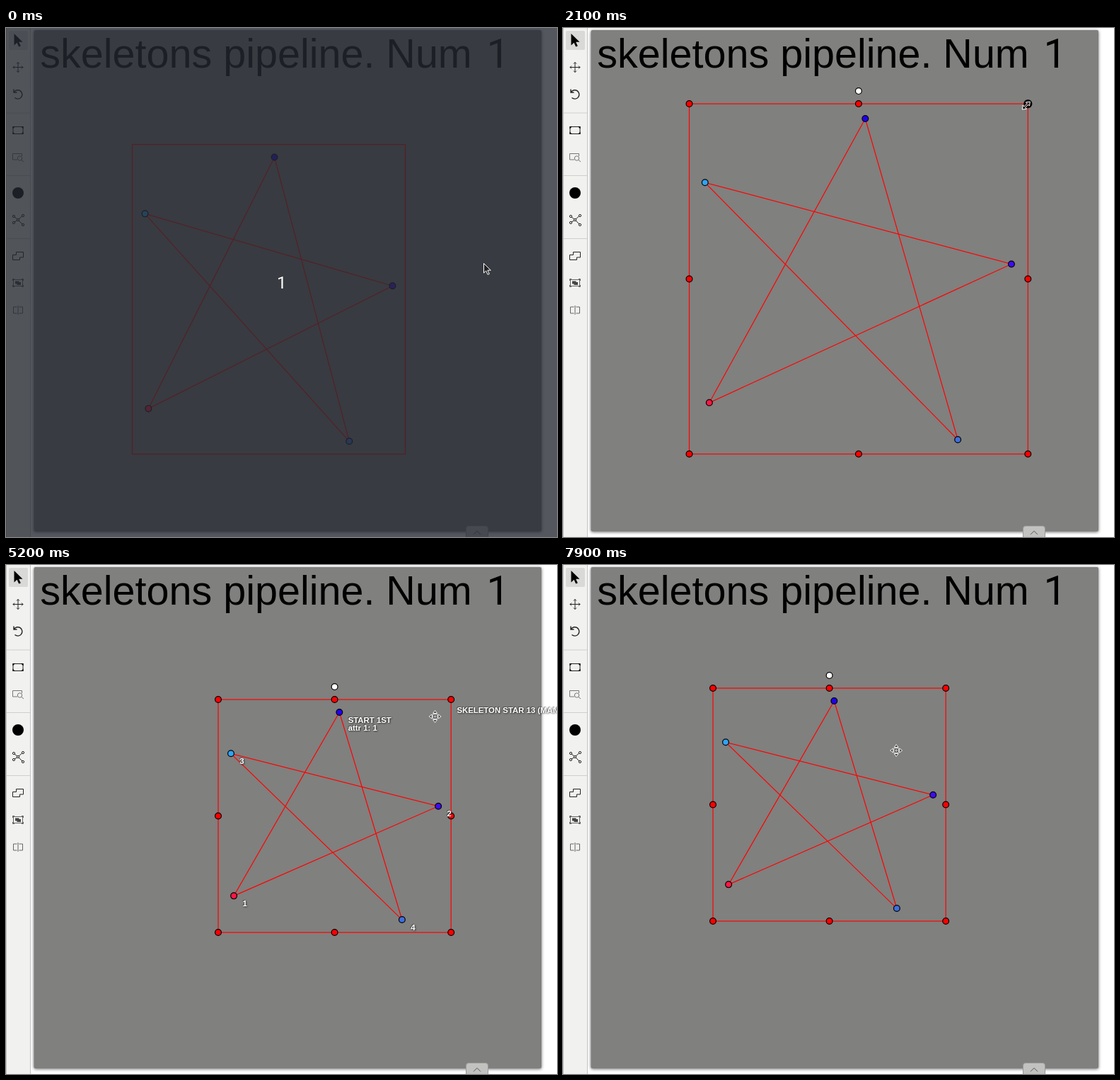
Write an HTML page that moves like this. It is 779 by 719 pixels and loops after 8 s.

```html
<!DOCTYPE html>
<html lang="en">
<head>
<meta charset="utf-8">
<title>Skeleton editing</title>
<style>
  html, body { margin: 0; width: 100%; height: 100%; overflow: hidden; background: #fff; }
  svg { display: block; width: 779px; height: 719px; }
  text { font-family: "Liberation Sans", Arial, sans-serif; }
  .one { font-family: Roboto, sans-serif; }
  .canvas { filter: drop-shadow(0 1px 2px rgba(0, 0, 0, .6)); }
  .icons { fill: none; stroke: #222; stroke-width: 1; }
  .icons .solid { fill: #000; stroke: none; }
  .edges { fill: none; stroke: #f00; stroke-width: 1.2; }
  .dots { stroke: #000; stroke-width: 1.2; }
  .labels { fill: #fff; font-size: 11.4px; font-weight: bold;
    filter: drop-shadow(1px 1px 1px rgba(0, 0, 0, .6)) drop-shadow(-.5px -.5px .5px rgba(0, 0, 0, .35)); }
</style>
</head>
<body>
<svg viewBox="0 0 779 719">
  <rect width="779" height="719" fill="#fff"/>
  <rect width="34.5" height="719" fill="#f1f1ef"/>
  <path d="M.5 0V719M34.5 0V719" stroke="#c4c4c2"/>
  <path d="M1 120H34M1 208.5H34M1 297.5H34" stroke="#cfcfcd"/>
  <rect x="4" y="4" width="27" height="27" rx="2" fill="#d9d9d7"/>
  <g class="icons">
    <path class="solid" d="M11.5 8V24.5L15.5 20.8L18.2 26.6L20.8 25.4L18.2 19.8H23.5Z"/>
    <path d="M17 48.5V62.5M10 55.5H24M15 50.5L17 48.5L19 50.5M15 60.5L17 62.5L19 60.5M12 53.5L10 55.5L12 57.5M22 53.5L24 55.5L22 57.5"/>
    <path d="M11.5 90.5A6.2 6.2 0 1 1 12.5 98.5M11 86.5V91H15.5" stroke-width="1.4"/>
    <rect x="10" y="139.500" width="14" height="10"/>
    <path class="solid" d="M9.500 139H13L9.500 142.500ZM24.500 139V142.500L21 139ZM24.500 150H21L24.500 146.500ZM9.500 150V146.500L13 150Z"/>
    <g stroke="#777"><path d="M16 186H9.500V177.500H22.500V181"/><circle cx="19.500" cy="184" r="3.200"/><path d="M22 186.500L25 189"/></g>
    <circle class="solid" cx="17" cy="233" r="8"/>
    <path d="M11.500 266.500L17 271L23 265.500M17 271L11.500 274.500M17 271L23 277"/>
    <g fill="#f1f1ef"><circle cx="11" cy="266" r="1.600"/><circle cx="24" cy="265" r="1.600"/><circle cx="11" cy="275" r="1.600"/><circle cx="24" cy="278" r="1.600"/><circle cx="17" cy="271" r="1.600"/></g>
    <path d="M14.500 316.500H24.500V324H19.500V327.500H9.500V320.500H14.500Z"/>
    <g stroke="#666"><rect x="10.500" y="355.500" width="13" height="9"/><path d="M9.500 357V354.500H12M22 354.500H24.500V357M24.500 363V365.500H22M12 365.500H9.500V363"/></g>
    <path d="M13 357.500H18.500V359H21V363H15.500V361.500H13Z" fill="#444" stroke="none"/>
    <path d="M15.500 394H10.500V403H15.500M18.500 394H23.500V403H18.500M17 392V405" stroke="#666"/>
  </g>

  <rect class="canvas" x="39.500" y="3" width="717.500" height="708" rx="2" fill="#80807e"/>
  <text x="48.300" y="56" font-size="57.500">skeletons pipeline. Num</text>
  <text class="one" x="679.500" y="56" font-size="57.500">1</text>
  <path d="M650.500 719V707Q650.500 703.500 654 703.500H678Q681.500 703.500 681.500 707V719" fill="#c2c2c0" stroke="#9a9a9a"/>
  <path d="M661 715.500L666 710.500L671 715.500" fill="none" stroke="#555"/>

  <g class="edges"><rect id="box"/><path id="star"/></g>
  <g id="dots" class="dots"></g>
  <g id="labels" class="labels"></g>

  <g id="veil">
    <rect width="779" height="719" fill="#252830" fill-opacity=".78"/>
    <text class="one" x="383" y="368" font-size="24" fill="#fff">1</text>
  </g>

  <path id="arrow" d="M0 0V13.500L3.200 10.500L5.600 15.800L7.800 14.800L5.400 9.700H9.800Z" fill="#222" stroke="#fff"/>
  <path id="resize" d="M5.500 -5.500L4.700 .5L2.900 -1.300L-1.300 2.900L.5 4.700L-5.500 5.500L-4.700 -.5L-2.900 1.300L1.300 -2.900L-.5 -4.700Z" fill="#222" stroke="#fff"/>
  <g id="move" fill="#444" stroke="#fff" stroke-width=".9">
    <path d="M0 -8.500L3 -4.500H-3ZM0 8.500L3 4.500H-3ZM-8.500 0L-4.500 -3V3ZM8.500 0L4.500 -3V3Z"/>
    <rect x="-3.200" y="-3.200" width="6.400" height="6.400" rx="1.500"/>
    <circle r="1.200"/>
  </g>
</svg>
<script>
const LOOP = 8000, STEP = 100;
const PAD = 18;       // box margin around the joints
const LAG = 8;        // joints trail the box while dragging
const SET_OFF = 300, HOVER = 800, TRAVEL = 400;
const HOME = [675.5, 332.5];
const JOINT_AREA = [196.5, 182.5, 546.5, 583.8];

// at: press, arrive, release; to: new top right corner (resize) or top left (move);
// grab: cursor relative to the top right corner
const drags = [
  { tool: "resize", at: [1410, 2250, 2600], to: [677.5, 94.6], grab: [-2.5, 2.5] },
  { tool: "resize", at: [3094, 3700, 4100], to: [500.3, 283.2], grab: [-8, 2] },
  { tool: "move", at: [4600, 5100, 5200], to: [300, 190], grab: [-22.6, 24] },
  { tool: "move", at: [5400, 5800, 5900], to: [102.2, 105], grab: [-54.7, 54] },
  { tool: "move", at: [6150, 6300, 6400], to: [211, 226], grab: [-54.7, 54] },
  { tool: "move", at: [6400, 6700, 6900], to: [284, 291.7], grab: [-50, 58] },
  { tool: "move", at: [7400, 7890, LOOP], to: [212, 174], grab: [-70, 88] }
];

// relative position, colour, caption; neighbours are joined in a ring
const joints = [
  { at: [.523, 0], fill: "#1f00f0", lines: ["START 1ST", "attr 1: 1"] },
  { at: [.014, .885], fill: "#ff1744", lines: ["1"] },
  { at: [1, .453], fill: "#3d0cf0", lines: ["2"] },
  { at: [0, .199], fill: "#2fa4f5", lines: ["3"] },
  { at: [.825, 1], fill: "#3f6fdc", lines: ["4"] }
];

const $ = id => document.getElementById(id);
const mix = (a, b, k) => a + (b - a) * k;
const progress = (t, from, to) => Math.min(1, Math.max(0, (t - from) / (to - from)));
const inset = ([l, t, r, b], x, y) => [l + x, t + y, r - x, b - y];
const within = ([l, t, r, b], [u, v]) => [mix(l, r, u), mix(t, b, v)];
const show = (el, on) => { el.style.display = on ? "" : "none"; };
const set = (el, attrs) => {
  for (const k in attrs) el.setAttribute(k, attrs[k]);
};
function add(parent, tag, attrs, text = "") {
  const el = document.createElementNS("http://www.w3.org/2000/svg", tag);
  set(el, attrs);
  el.textContent = text;
  return parent.appendChild(el);
}

function dragBox([l, t, r, b], { tool, to: [x, y] }, k) {
  if (tool === "resize") return [l, mix(t, y, k), mix(r, x, k), b];
  const dx = (x - l) * k, dy = (y - t) * k;
  return [l + dx, t + dy, r + dx, b + dy];
}

// Replays the drags up to time t; the box is refitted after each release.
function pose(t) {
  let area = JOINT_AREA, box = inset(area, -PAD, -PAD), cursor = HOME, free = SET_OFF;
  for (const d of drags) {
    const [press, arrive, release] = d.at;
    const grip = () => [box[2] + d.grab[0], box[1] + d.grab[1]];
    if (t < press) {
      const k = progress(t, free, free + TRAVEL), goal = grip();
      cursor = cursor.map((c, i) => mix(c, goal[i], k));
      return { area, box, cursor, tool: d.tool, dragging: false };
    }
    const [l, top, r, b] = box;
    box = dragBox(box, d, progress(t, press, arrive));
    area = inset(box, PAD * (box[2] - box[0]) / (r - l), PAD * (box[3] - box[1]) / (b - top));
    cursor = grip();
    if (t < release) return { area, box, cursor, tool: d.tool, dragging: true };
    box = inset(area, -PAD, -PAD);
    free = release;
  }
}

const dot = fill => add($("dots"), "circle", { r: 4.4, fill });
const sides = [0, .5, 1];
const grips = sides.flatMap(u => sides.map(v => [u, v]))
  .filter(([u, v]) => u !== .5 || v !== .5)
  .map(at => ({ at, el: dot("#f00") }));
const corner = grips.find(({ at: [u, v] }) => u === 1 && v === 0).el;
const pivot = dot("#fff");
for (const j of joints) {
  j.el = dot(j.fill);
  j.text = j.lines.map(s => add($("labels"), "text", {}, s));
}
const title = add($("labels"), "text", {}, "SKELETON STAR 13 (MANUAL)");

function draw(t) {
  const { box, cursor, tool, dragging } = pose(t);
  const { area } = pose(t - LAG);
  const active = t >= HOVER;
  const [l, top, r, b] = box;

  set($("box"), { x: l, y: top, width: r - l, height: b - top });
  const points = joints.map(j => within(area, j.at));
  set($("star"), { d: `M${points.join("L")}Z` });
  joints.forEach((j, i) => {
    const [x, y] = points[i];
    set(j.el, { cx: x, cy: y });
    j.text.forEach((el, n) => set(el, { x: x + 12.3, y: y + 14.5 + n * 11.7 }));
  });

  for (const { at, el } of grips) {
    const [x, y] = within(box, at);
    set(el, { cx: x, cy: y });
    show(el, active);
  }
  set(corner, { "stroke-width": tool === "resize" ? 3.4 : 1.2 });
  set(pivot, { cx: (l + r) / 2, cy: top - PAD });
  show(pivot, active);

  set(title, { x: r + 8.2, y: top + 18.5 });
  show($("labels"), active && !dragging);
  show($("veil"), t < STEP);
  for (const id of ["arrow", "move", "resize"]) {
    set($(id), { transform: `translate(${cursor})` });
    show($(id), id === (active ? tool : "arrow"));
  }
}

const start = performance.now();
function tick() {
  const t = (performance.now() - start) % LOOP;
  draw(Math.floor(t / STEP) * STEP);
  requestAnimationFrame(tick);
}
draw(0);
requestAnimationFrame(tick);
</script>
</body>
</html>
```
